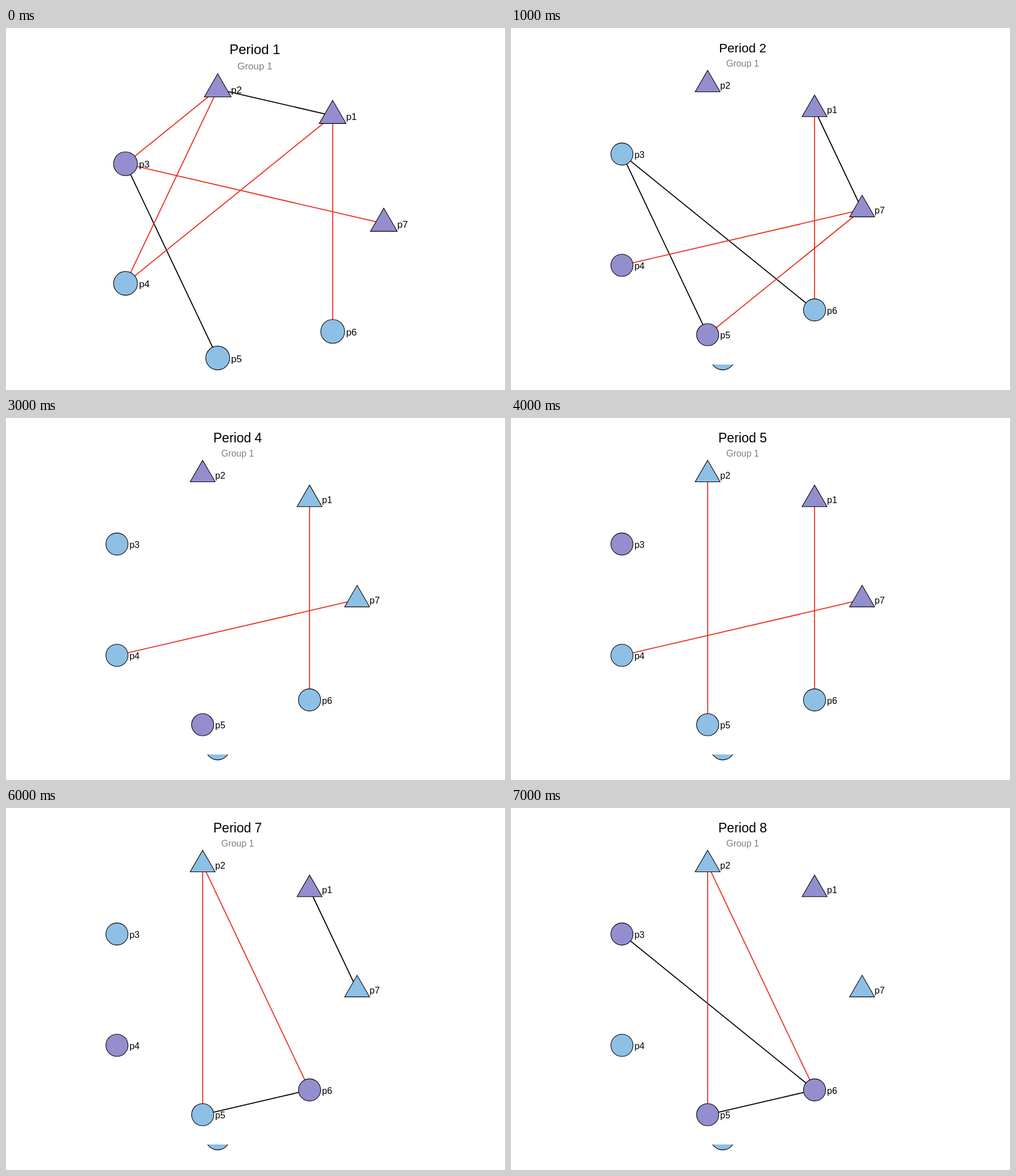
Recreate the animation shown at these times as an HTML page. Size 878 px wide and 638 px high, loop 8000 ms.

```html
<!DOCTYPE html>
<html lang="en">
<head>
<meta charset="utf-8">
<title>Network by period</title>
<style>
  html, body { margin: 0; width: 100%; height: 100%; overflow: hidden; background: #fff; }
  svg { display: block; width: 878px; height: 638px; font-family: "Liberation Sans", Arial, sans-serif; }
  .period { visibility: hidden; animation: show 8s step-end infinite; }
  @keyframes show {
    0% { visibility: visible; }
    12.5%, 100% { visibility: hidden; }
  }
  .node { stroke: #000; stroke-width: 1.1; }
  .purple { fill: #938ece; }
  .blue { fill: #8ebfe5; }
  .edge { stroke: #000; stroke-width: 1.8; }
  .mixed { stroke: #eb2d1e; }
  .title, .group { text-anchor: middle; }
  .group { fill: #7f7f7f; }
</style>
</head>
<body>
<svg id="stage" viewBox="0 0 878 638">
  <clipPath id="strip"><rect y="593" width="878" height="45"/></clipPath>
</svg>
<script>
const stage = document.getElementById('stage');

const large = { cx: 425.7, cy: 344.7, rx: 239.1, ry: 243, dot: 21, tri: 27.3,
  mid: 437.9, title: 24, titleY: 46, label: 17, groupY: 73, dx: 23.6, dy: 7 };
const small = { cx: 395.5, cy: 320.2, rx: 222.3, ry: 226, dot: 19.5, tri: 25.4,
  mid: 407.6, title: 23, titleY: 42.5, label: 16, groupY: 68, dx: 22, dy: 6.7 };

// Purple nodes, then edges as pairs of node numbers
const periods = [
  ['1237', '12 35 23 24 14 16 37'],
  ['12457', '17 35 36 16 47 57'],
  ['136', '12 17 34 45 46 25 16 57'],
  ['25', '16 47'],
  ['137', '16 47 25'],
  ['16', '56 23 25 26 37 14 47 57'],
  ['146', '17 56 25 26'],
  ['1356', '36 56 25 26']
];

const isTriangle = n => n < 3 || n === 7;

function add(parent, tag, attrs, text) {
  const el = document.createElementNS(stage.namespaceURI, tag);
  for (const key in attrs) el.setAttribute(key, attrs[key]);
  if (text) el.textContent = text;
  return parent.appendChild(el);
}

function place(n, s) {
  const a = n * 2 * Math.PI / 7;
  return [s.cx + s.rx * Math.cos(a), s.cy - s.ry * Math.sin(a)];
}

function drawNode(parent, n, s, color) {
  const [x, y] = place(n, s);
  if (!isTriangle(n)) {
    add(parent, 'circle', { class: 'node ' + color, cx: x, cy: y, r: s.dot });
    return;
  }
  const half = s.tri * Math.sqrt(3) / 2, base = y + s.tri / 2;
  add(parent, 'path', { class: 'node ' + color,
    d: `M${x} ${y - s.tri}L${x + half} ${base}H${x - half}Z` });
}

function drawEdge(parent, pair, s) {
  const [a, b] = [...pair].map(Number);
  const [x1, y1] = place(a, s), [x2, y2] = place(b, s);
  const mixed = isTriangle(a) !== isTriangle(b);
  add(parent, 'line', { class: mixed ? 'edge mixed' : 'edge', x1, y1, x2, y2 });
}

periods.forEach(([purple, edges], i) => {
  const s = i ? small : large;
  const g = add(stage, 'g', { class: 'period', style: `animation-delay:${i ? i - 8 : 0}s` });
  const nodes = [1, 2, 3, 4, 5, 6, 7];

  // Remnant of the larger first plot below the smaller ones
  if (i) drawNode(add(g, 'g', { 'clip-path': 'url(#strip)' }), 5, large, 'blue');

  edges.split(' ').forEach(pair => drawEdge(g, pair, s));
  nodes.forEach(n => drawNode(g, n, s, purple.includes(n) ? 'purple' : 'blue'));
  nodes.forEach(n => {
    const [x, y] = place(n, s);
    add(g, 'text', { x: x + s.dx, y: y + s.dy, 'font-size': s.label }, 'p' + n);
  });

  const size = i === 1 ? 22.4 : s.title;
  add(g, 'text', { class: 'title', x: s.mid, y: s.titleY, 'font-size': size }, 'Period ' + (i + 1));
  add(g, 'text', { class: 'group', x: s.mid, y: s.groupY, 'font-size': s.label }, 'Group 1');
});
</script>
</body>
</html>
```
